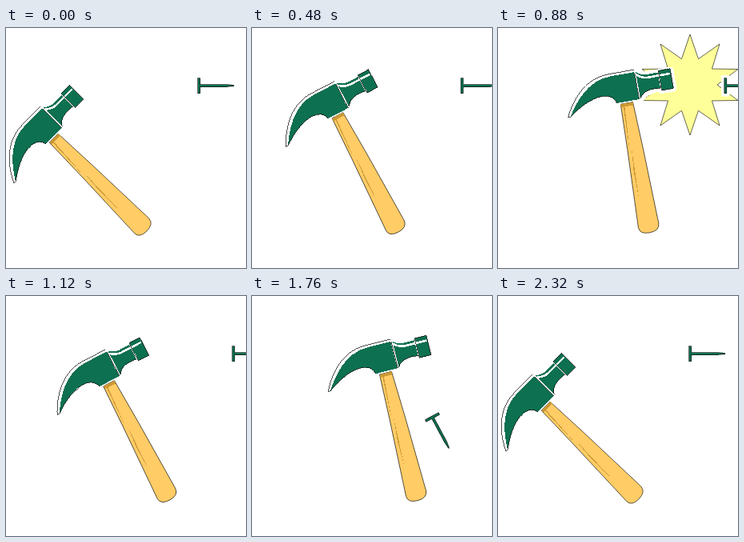
Write an HTML page that moves like this. It is 300 px wide and 300 px high and loops after 2.4 s.

```html
<!DOCTYPE html>
<html lang="en">
<head>
<meta charset="utf-8">
<title>Hammer and nail</title>
<style>
  html, body { margin: 0; width: 100%; height: 100%; overflow: hidden; background: #fff; }
  svg { display: block; width: 100vw; height: 100vh; shape-rendering: crispEdges; }
  .green { fill: #0d7050; }
  .halo { fill: #fff; stroke: #fff; stroke-width: 8; stroke-linejoin: round; }
  .thin { stroke: #000; stroke-width: .6; stroke-linejoin: round; }
  .line { fill: none; stroke: #000; stroke-width: .7; }
  .shine { fill: none; stroke: #fff; stroke-width: 2.6; }
</style>
</head>
<body>
<svg viewBox="0 0 300 300">
  <path id="star" class="thin" fill="#ffff99"/>

  <!-- the nail is centred on its own origin -->
  <g id="nail">
    <path class="halo" d="M-22.5-9.5h3v8h38v3h-38v8h-3z"/>
    <path class="green thin" d="M-22.5-9.5h3v8h34l8.500 1.2v.8l-8.500 1h-34v8h-3z"/>
  </g>

  <!-- the hammer stands on the butt of its handle -->
  <g id="hammer"><g transform="translate(-210 -250)">
    <path class="halo" d="M138 97C147 82 166 55.500 196 55.500H226L240 61H271V84H256V81Q238 80 228 90H198C195 74 170 73 138 97Z"/>
    <path class="thin" fill="#ffcc66" d="M202.500 92H218L220.500 150L223.500 247Q223 256.500 210 256.500Q198 256.500 197.500 248L201 150Z"/>
    <path fill="#cc9933" d="M202.500 92H218V96H202.500ZM206.500 148L204.500 212L204 178Z"/>
    <path fill="#cc9933" d="M205 130L207 96H205.500L203.500 150Z"/>
    <path class="green" d="M138 97C147 82 166 55.500 196 55.500H226V90H198C195 74 170 73 138 97Z"/>
    <path class="green" d="M228 56Q235 61 241 61H255V81C242 79 233 81 228 89Z"/>
    <path class="green" d="M256.500 59H271V84H256.500Z"/>
    <path class="shine" d="M228 59Q235 65 242 65H270"/>
    <path class="line" d="M138 97L135 97C143 80 162 52.500 194 52.500H226"/>
    <path class="line" d="M138 97C170 73 195 74 198 90M226.500 56V90M228 89C233 81 242 79 255 81M256 59V84H271V59H256"/>
  </g></g>
</svg>
<script>
const LOOP = 2400, TICK = 80, BEAT = 640, PUSH = 21.6;
const el = id => document.getElementById(id);
const linear = u => u;
const smooth = u => (1 - Math.cos(Math.PI * u)) / 2;

// Rows are [time, ...values]; a trailing function eases the way to that row.
function sample(rows, t) {
  let i = 1;
  while (i < rows.length - 1 && t >= rows[i][0]) i++;
  const a = rows[i - 1], b = rows[i];
  const ease = typeof b[b.length - 1] === 'function' ? b[b.length - 1] : linear;
  const u = ease(Math.min(1, Math.max(0, (t - a[0]) / (b[0] - a[0]))));
  return b.slice(1).filter(v => typeof v === 'number')
    .map((v, k) => a[k + 1] + (v - a[k + 1]) * u);
}

// Hammer: x of the handle butt, angle.
const swing = [];
for (let n = 0; n < 3; n++) {
  const t = n * BEAT, x = 166.5 + n * PUSH;
  swing.push(
    [t, x + 4.7, -45, smooth],
    [t + 80, x + 3, -24],
    [t + 160, x, 0],
    [t + 240, x, -10],
    [t + 320, x, -10]);
}
swing.push([2320, 171.2, -45, smooth], [LOOP, 171.2, -45]);

// Nail on its way back: x, y, angle.
const comeback = [
  [1600, 232, 183, 70],
  [2320, 261, 72, 0, smooth],
  [LOOP, 262, 72, 0]
];

const burst = [[0, 0], [80, .16], [160, .58], [240, 1], [320, .58], [400, .16], [480, 0], [BEAT, 0]];

function starPath(size) {
  let d = '';
  for (let i = 0; i < 20; i++) {
    const r = size * (i % 2 ? 34 : 63), a = i * Math.PI / 10;
    d += (i ? 'L' : 'M') + (240 + r * Math.sin(a)).toFixed(2) + ' ' + (71 - r * Math.cos(a)).toFixed(2);
  }
  return d + 'Z';
}

function place(id, x, y, angle) {
  el(id).setAttribute('transform', `translate(${x} ${y}) rotate(${angle})`);
}

function draw(t) {
  const [x, angle] = sample(swing, t);
  place('hammer', x, 249.5, angle);

  if (t > 1600) {
    place('nail', ...sample(comeback, t));
  } else {
    const hits = Math.floor((t - 240) / BEAT) + 1;
    place('nail', 262 + hits * PUSH, 72, 0);
  }

  const size = t < 3 * BEAT ? sample(burst, t % BEAT)[0] : 0;
  el('star').setAttribute('d', size > 0 ? starPath(size) : '');
}

const start = performance.now();
function frame(now) {
  const t = Math.max(0, now - start) % LOOP;
  draw(Math.floor(t / TICK) * TICK);
  requestAnimationFrame(frame);
}
draw(0);
requestAnimationFrame(frame);
</script>
</body>
</html>
```
